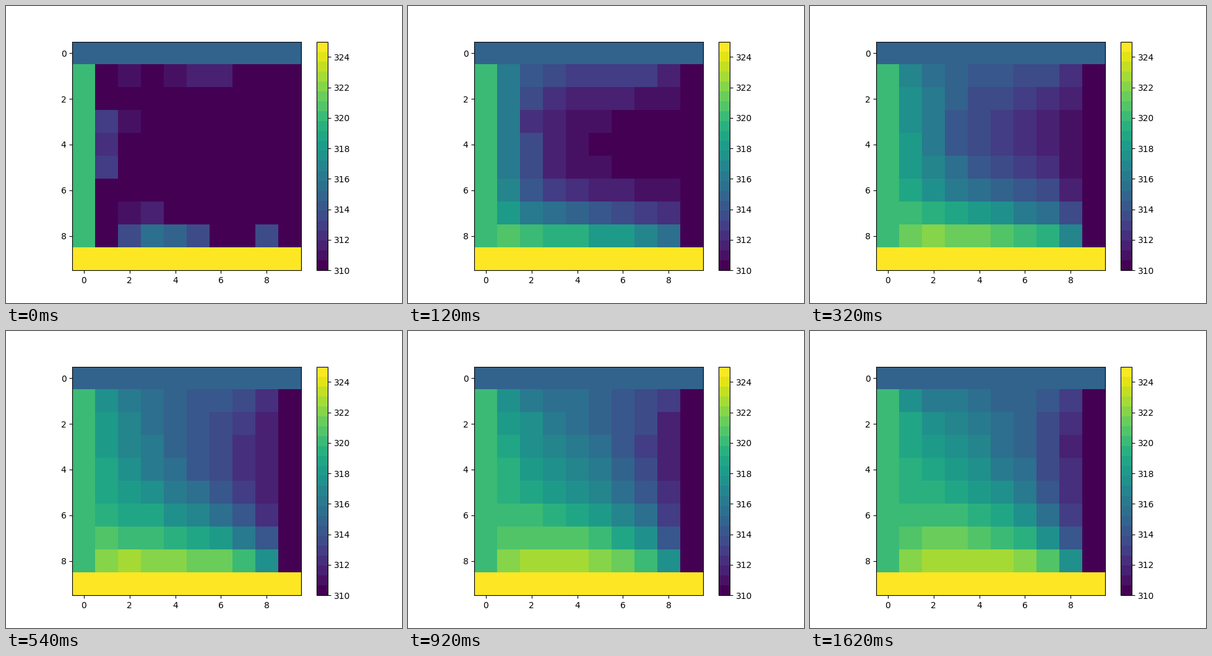
Animation of 640 by 480 pixels, one loop 3950 ms. Source, as a matplotlib script:

```python
import random

import matplotlib.pyplot as plt
import numpy as np
from matplotlib.animation import FuncAnimation

LOOP_MS, TICK_MS, STEP_MS = 3950, 10, 20
SIZE, LEVELS = 10, 23
TOP, LEFT, BOTTOM, COLD = 315, 320, 325, 310

# Cells relaxed before the first picture, in order
FIRST = [(1, 2), (1, 4), (1, 5), (1, 6), (4, 1), (3, 1), (5, 1), (3, 2),
         (8, 5), (8, 4), (8, 2), (8, 3), (7, 2), (7, 3), (8, 8)]

# Steps at which the plate is redrawn; it holds still in between
SHOWN = [*range(28), 29, 31, 34, 37, 41, 43, 46, 53, 59, 78, 81]


def relax(plate, r, c, weight=1.0):
    """Pull one cell towards the mean of its four neighbours."""
    mean = (plate[r - 1, c] + plate[r + 1, c]
            + plate[r, c - 1] + plate[r, c + 1]) / 4
    plate[r, c] += weight * (mean - plate[r, c])


def simulate():
    rng = random.Random(7)
    inner = SIZE - 2
    plate = np.full((SIZE, SIZE), float(COLD))
    plate[:, 0] = LEFT
    plate[0], plate[-1] = TOP, BOTTOM
    for r, c in FIRST:
        relax(plate, r, c)
    history = [plate.copy()]
    for _ in range(SHOWN[-1]):
        for _ in range(2 * inner * inner):
            relax(plate, rng.randint(1, inner), rng.randint(1, inner), 0.5)
        history.append(plate.copy())
    return history


history = simulate()

fig, ax = plt.subplots(figsize=(6.4, 4.8), dpi=100)
image = ax.imshow(history[0], cmap=plt.get_cmap("viridis", LEVELS),
                  vmin=COLD, vmax=BOTTOM)
fig.colorbar(image)


def update(i):
    step = i * TICK_MS // STEP_MS
    image.set_data(history[max(s for s in SHOWN if s <= step)])
    return [image]


anim = FuncAnimation(fig, update, frames=LOOP_MS // TICK_MS, interval=TICK_MS,
                     init_func=lambda: update(0), repeat=True, repeat_delay=0)
plt.show()
```
